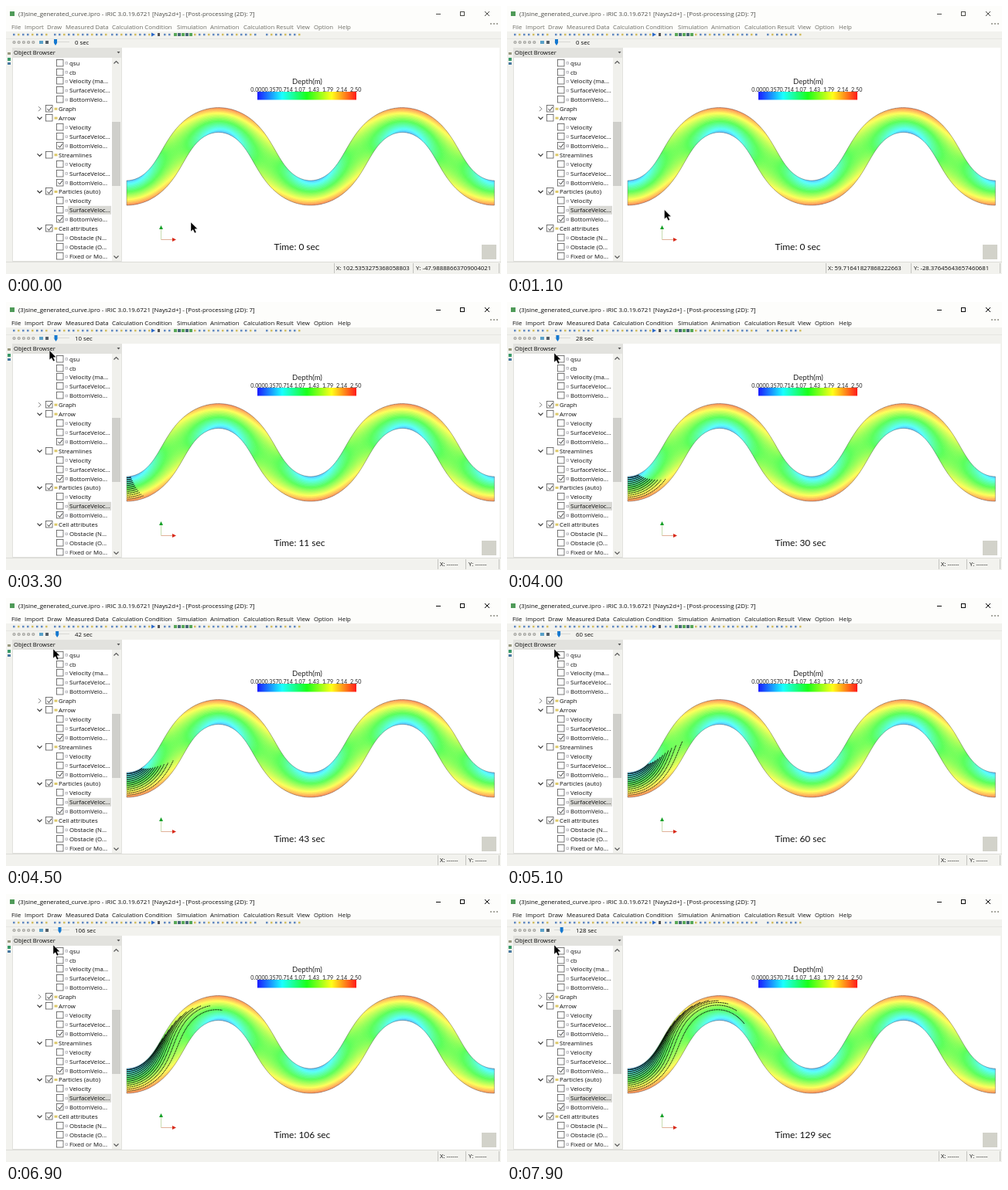
An HTML page with a canvas for the animation above (8 s loop, 640x347 px).

```html
<!DOCTYPE html>
<html lang="en">
<head>
<meta charset="utf-8">
<title>River bend particles</title>
<style>
html, body { margin: 0; width: 100%; height: 100%; overflow: hidden; background: #fff; }
canvas { display: block; width: 640px; height: 347px; }
</style>
</head>
<body>
<canvas id="stage" width="640" height="347"></canvas>
<script>
const ctx = document.getElementById('stage').getContext('2d');
const LOOP = 8000;
const UI = '"Open Sans", "Noto Sans", sans-serif';
const PLOT = 'Lato, "Open Sans", sans-serif';
const PANEL = '#f2f2ee';
const INK = '#0a0a0a';

// ---------- helpers ----------
const clamp = (v, a, b) => Math.max(a, Math.min(b, v));

function rect(x, y, w, h, color, g = ctx) {
  g.fillStyle = color;
  g.fillRect(x, y, w, h);
}

function text(str, x, y, size, color, font = UI, align = 'left') {
  ctx.font = `${size}px ${font}`;
  ctx.fillStyle = color;
  ctx.textAlign = align;
  ctx.textBaseline = 'alphabetic';
  ctx.fillText(str, x, y);
}

function path(points, color, width = 1, g = ctx) {
  g.beginPath();
  points.forEach(([x, y], i) => i ? g.lineTo(x, y) : g.moveTo(x, y));
  g.strokeStyle = color;
  g.lineWidth = width;
  g.stroke();
}

function shape(points, color, g = ctx) {
  g.beginPath();
  points.forEach(([x, y]) => g.lineTo(x, y));
  g.closePath();
  g.fillStyle = color;
  g.fill();
}

function dot(x, y, r, color) {
  ctx.beginPath();
  ctx.arc(x, y, r, 0, 7);
  ctx.fillStyle = color;
  ctx.fill();
}

// Linear interpolation through rows of [time, ...values].
function track(keys, t) {
  if (t <= keys[0][0]) return keys[0].slice(1);
  for (let i = 1; i < keys.length; i++) {
    const a = keys[i - 1], b = keys[i];
    if (t <= b[0]) {
      const p = (t - a[0]) / (b[0] - a[0]);
      return a.slice(1).map((v, k) => v + (b[k + 1] - v) * p);
    }
  }
  return keys[keys.length - 1].slice(1);
}

// ---------- sine-generated channel ----------
const OMEGA = 1.05, WAVE = 320, HALF = 16, LEN = WAVE * 2;
const center = [];
{
  let x = 156, y = 242;
  for (let s = 0; s <= LEN; s++) {
    const a = OMEGA * Math.sin(2 * Math.PI * s / WAVE);
    center.push({ x, y, a });
    const m = OMEGA * Math.sin(2 * Math.PI * (s + 0.5) / WAVE);
    x += Math.cos(m);
    y -= Math.sin(m);
  }
}

// n runs from -1 (right bank) to 1 (left bank), looking downstream.
function place(s, n) {
  const i = clamp(Math.floor(s), 0, LEN - 1), f = clamp(s - i, 0, 1);
  const p = center[i], q = center[i + 1];
  const a = p.a + (q.a - p.a) * f, d = n * HALF;
  return [p.x + (q.x - p.x) * f - Math.sin(a) * d,
          p.y + (q.y - p.y) * f - Math.cos(a) * d];
}

const depthColor = v => `hsl(${240 * (1 - v)}, 100%, 68%)`;

const river = document.createElement('canvas');
river.width = 640;
river.height = 347;
{
  const g = river.getContext('2d'), rows = 24;
  for (let s = 0; s < LEN; s += 2) {
    const bend = Math.cos(2 * Math.PI * s / WAVE - 0.15);
    for (let k = 0; k < rows; k++) {
      const a = k / rows * 2 - 1, b = Math.min(1, (k + 1.4) / rows * 2 - 1);
      const n = (k + 0.5) / rows * 2 - 1, e = Math.min(LEN, s + 2.8);
      const v = 0.54 - 0.39 * n * bend + 0.05 * n * n * (1 - Math.abs(bend));
      shape([place(s, a), place(e, a), place(e, b), place(s, b)], depthColor(v), g);
    }
  }
  for (const n of [-1, 1]) path(center.map((_, s) => place(s, n)), 'rgba(40,40,40,.55)', 0.7, g);
  for (const s of [0, LEN]) path([place(s, -1), place(s, 1)], 'rgba(40,40,40,.5)', 0.7, g);
}

// ---------- particles ----------
const LANES = 12;

function particles(sec) {
  ctx.fillStyle = INK;
  for (let i = 0; i < LANES; i++) {
    const k = i / (LANES - 1);
    const start = Math.atanh(-0.83 + 1.73 * k);
    const speed = 1.55 * (1 - 0.55 * Math.pow(k, 0.75));
    for (let age = sec; age > 0; age--) {
      const s = age * speed;
      const drift = 0.56 * (Math.sin(2 * Math.PI * s / WAVE - 1.2) + Math.sin(1.2));
      const [x, y] = place(s, Math.tanh(Math.min(start + drift, 1.75)));
      ctx.fillRect(x - 0.5, y - 0.5, 1, 1);
    }
  }
}

// ---------- window ----------
const MENU = [['File', 7], ['Import', 24], ['Draw', 53], ['Measured Data', 77],
  ['Calculation Condition', 137], ['Simulation', 221], ['Animation', 264],
  ['Calculation Result', 307], ['View', 376], ['Option', 398], ['Help', 429]];

function titleBar(active) {
  const ink = active ? INK : '#4c4c48';
  rect(0, 0, 640, 20, '#fdfdfb');
  rect(5, 7, 6, 6, '#4f9a58');
  text('(3)sine_generated_curve.ipro - iRIC 3.0.19.6721 [Nays2d+] - [Post-processing (2D): 7]',
    16, 12.6, 7.9, ink);
  path([[556, 10.5], [562, 10.5]], ink);
  ctx.strokeRect(587.5, 7.5, 5, 5);
  path([[619, 7], [625, 13]], ink);
  path([[625, 7], [619, 13]], ink);
  rect(0, 20, 640, 13, '#fdfdfb');
  for (const [name, x] of MENU) text(name, x, 29.7, 7.8, active ? INK : '#6c6c64');
  for (const x of [626, 630, 634]) rect(x, 22, 2, 2, '#a8a8a0');
}

const ICONS = ['#6088c0', '#a0a098', '#d0bc60', '#78848c', '#80ac80', '#b8b8b0'];

function toolBars(sec, slide) {
  rect(0, 33, 640, 21, PANEL);
  path([[0, 42.5], [640, 42.5]], '#e6e6e2');
  let n = 0;
  for (const [from, to] of [[9, 56], [62, 68], [74, 130], [136, 184], [204, 212], [243, 322], [336, 381]]) {
    for (let x = from; x <= to; x += 6) {
      rect(x, 35.8, 2.5, 2.5, ICONS[(n * 7 + n * n) % 6]);
      n++;
    }
  }
  shape([[188, 34.5], [193, 37], [188, 39.5]], '#2a68c8');
  rect(196, 35, 3, 4, '#555');
  for (let x = 217; x < 238; x += 5) rect(x, 35, 4, 4, x % 2 ? '#58a858' : '#486878');
  for (let x = 9; x < 38; x += 6.2) {
    dot(x + 1.5, 47, 2.1, '#a4a4a0');
    dot(x + 1.5, 47, 0.8, PANEL);
  }
  rect(43, 45, 5, 4, '#58a0c8');
  rect(51, 45, 4, 4, '#555f68');
  path([[61, 46.5], [82, 46.5]], '#d8d8d4');
  shape([[slide - 2, 43], [slide + 2, 43], [slide + 2, 48], [slide, 51], [slide - 2, 48]], '#1478d0');
  text(sec + ' sec', 89, 49.8, 7.8, INK);
}

// Rows: level (0 group, 1 child), checked, label, chevron.
const kids = on => [[1, 0, 'Velocity'], [1, 0, 'SurfaceVeloc...'], [1, on, 'BottomVelo...']];
const TREE = [
  [1, 0, 'qsu'], [1, 0, 'cb'], [1, 0, 'Velocity (ma...'], [1, 0, 'SurfaceVeloc...'], [1, 0, 'BottomVelo...'],
  [0, 1, 'Graph', '>'], [0, 0, 'Arrow', 'v'], ...kids(1),
  [0, 0, 'Streamlines', 'v'], ...kids(1),
  [0, 1, 'Particles (auto)', 'v'], ...kids(1),
  [0, 1, 'Cell attributes', 'v'],
  [1, 0, 'Obstacle (N...'], [1, 0, 'Obstacle (O...'], [1, 0, 'Fixed or Mo...']
];
const SELECTED = 16;

function treeRow([level, on, label, chevron], i) {
  const y = 73.6 + i * 11.92, box = level ? 65.5 : 51.5;
  if (i === SELECTED) rect(80, y - 5.5, 56, 11, '#d9d9d5');
  rect(box, y - 4.5, 9, 9, '#fff');
  ctx.strokeStyle = '#555';
  ctx.lineWidth = 0.8;
  ctx.strokeRect(box, Math.round(y - 5) + 0.5, 8.5, 8.5);
  if (on) path([[box + 2, y], [box + 4, y + 2.3], [box + 7.5, y - 2.5]], '#333', 1);
  if (level) {
    ctx.strokeStyle = '#a8a8b0';
    ctx.strokeRect(77, y - 1, 2.5, 2.5);
  } else {
    rect(62.5, y - 1.5, 4, 3, '#dcc868');
  }
  if (chevron === 'v') path([[40.5, y - 1.5], [43.5, y + 1.5], [46.5, y - 1.5]], '#333', 1.2);
  if (chevron === '>') path([[42, y - 3], [45, y], [42, y + 3]], '#777', 1);
  text(label, level ? 82 : 68, y + 3, 7.8, INK);
}

function sidePanel() {
  rect(0, 54, 150, 277, PANEL);
  rect(2, 60, 4, 3, '#9a9a80');
  rect(2, 67, 4, 4, '#3a9a68');
  rect(2, 73, 4, 3, '#4878a0');
  rect(8, 54, 141, 13, '#e2e2de');
  text('Object Browser', 10, 63.2, 7.55, INK);
  shape([[143.5, 59], [147.5, 59], [145.5, 61.5]], '#555');
  rect(9, 67, 128, 263, '#fff');
  ctx.save();
  ctx.beginPath();
  ctx.rect(9, 67, 128, 263);
  ctx.clip();
  TREE.forEach(treeRow);
  ctx.restore();
  rect(137, 67, 11, 263, '#f0f0ec');
  rect(137, 150, 11, 83, '#cfcfcb');
  path([[139.5, 74.5], [142.5, 71.5], [145.5, 74.5]], '#555', 1.1);
  path([[139.5, 323.5], [142.5, 326.5], [145.5, 323.5]], '#555', 1.1);
  path([[8.5, 67], [8.5, 330.5], [149.5, 330.5], [149.5, 54]], '#dcdcd8', 0.8);
}

function view(sec) {
  rect(150, 54, 488, 277, '#fff');
  ctx.drawImage(river, 0, 0);
  particles(sec);

  const bar = ctx.createLinearGradient(325, 0, 453, 0);
  for (let i = 0; i <= 8; i++) bar.addColorStop(i / 8, `hsl(${240 - 30 * i}, 100%, 55%)`);
  rect(325, 111, 128, 10.5, bar);
  text('Depth(m)', 389.5, 100.6, 9.5, '#222', PLOT, 'center');
  ['0.000', '0.357', '0.714', '1.07', '1.43', '1.79', '2.14', '2.50'].forEach((v, i) =>
    text(v, 325.5 + i * 18.1, 110.5, 7.2, '#222', PLOT, 'center'));

  path([[200.5, 302.5], [200.5, 289]], '#c8dcb0', 1);
  path([[200.5, 302.5], [215, 302.5]], '#e0b098', 1);
  shape([[198, 289], [200.5, 284], [203, 289]], '#16a028');
  shape([[215, 300], [220, 302.5], [215, 305]], '#d82818');

  text(`Time: ${sec} sec`, 346.5, 316, 11.9, '#111', PLOT);
  rect(615, 309, 19, 19, '#d2d2ca');
}

function coord(from, to, p) {
  if (p <= 0) return from;
  if (p >= 1) return to;
  return (+from + (to - from) * p).toPrecision(19);
}

function statusBar(active, p, q) {
  rect(0, 331, 640, 16, PANEL);
  path([[0, 331.5], [640, 331.5]], '#dcdcd8');
  rect(638, 54, 2, 277, PANEL);
  let x = 424, y = 526, a = '------', b = '------';
  if (active) {
    x = 558;
    y = 594;
  } else {
    a = coord('102.5353275368058803', '-4.6973088520448982308', p);
    b = coord('-47.98888663709004021', '-5.4952878693065443372', q);
    if (p > 0) { x = 412; y = 522; }
  }
  for (const c of [x, y, 637]) path([[c + 0.5, 333], [c + 0.5, 346]], '#c4c4c0');
  text('X: ' + a, x + 3, 341.8, 7.75, INK);
  text('Y: ' + b, y + 4, 341.8, 7.75, INK);
}

function pointer(x, y) {
  const tip = [[0, 0], [0, 12], [2.8, 9.6], [5, 14], [7, 13], [5, 8.8], [8.6, 8.6]]
    .map(([u, v]) => [x + u, y + v]);
  shape(tip, '#000');
  path([...tip, tip[0]], '#fff', 0.4);
}

// ---------- timing ----------
const MOUSE = [[0, 239, 280], [500, 239, 280], [1800, 162, 245], [1900, 150, 245],
  [2100, 78, 120], [2300, 32, 47], [2800, 32, 47], [3400, 61, 66]];
const CLOCK = [[2850, 0, 0], [4000, 30, 28], [5100, 60, 60], [5800, 78, 76],
  [6900, 106, 106], [7900, 129, 128]];

function draw(now) {
  const t = Math.floor((now % LOOP) / 100) * 100;
  const active = t >= 2800;
  const [mx, my] = track(MOUSE, t);
  const [sim, step] = track(CLOCK, t);
  const sec = Math.floor(sim + 1e-6), even = 2 * Math.floor(step / 2 + 1e-6);

  titleBar(active);
  toolBars(even, 64 + even * 0.052);
  sidePanel();
  view(sec);
  statusBar(active, clamp((239 - mx) / 89, 0, 1), clamp((280 - my) / 35, 0, 1));
  pointer(mx, my);
}

const began = performance.now();
function loop() {
  draw(performance.now() - began);
  requestAnimationFrame(loop);
}
loop();
</script>
</body>
</html>
```
